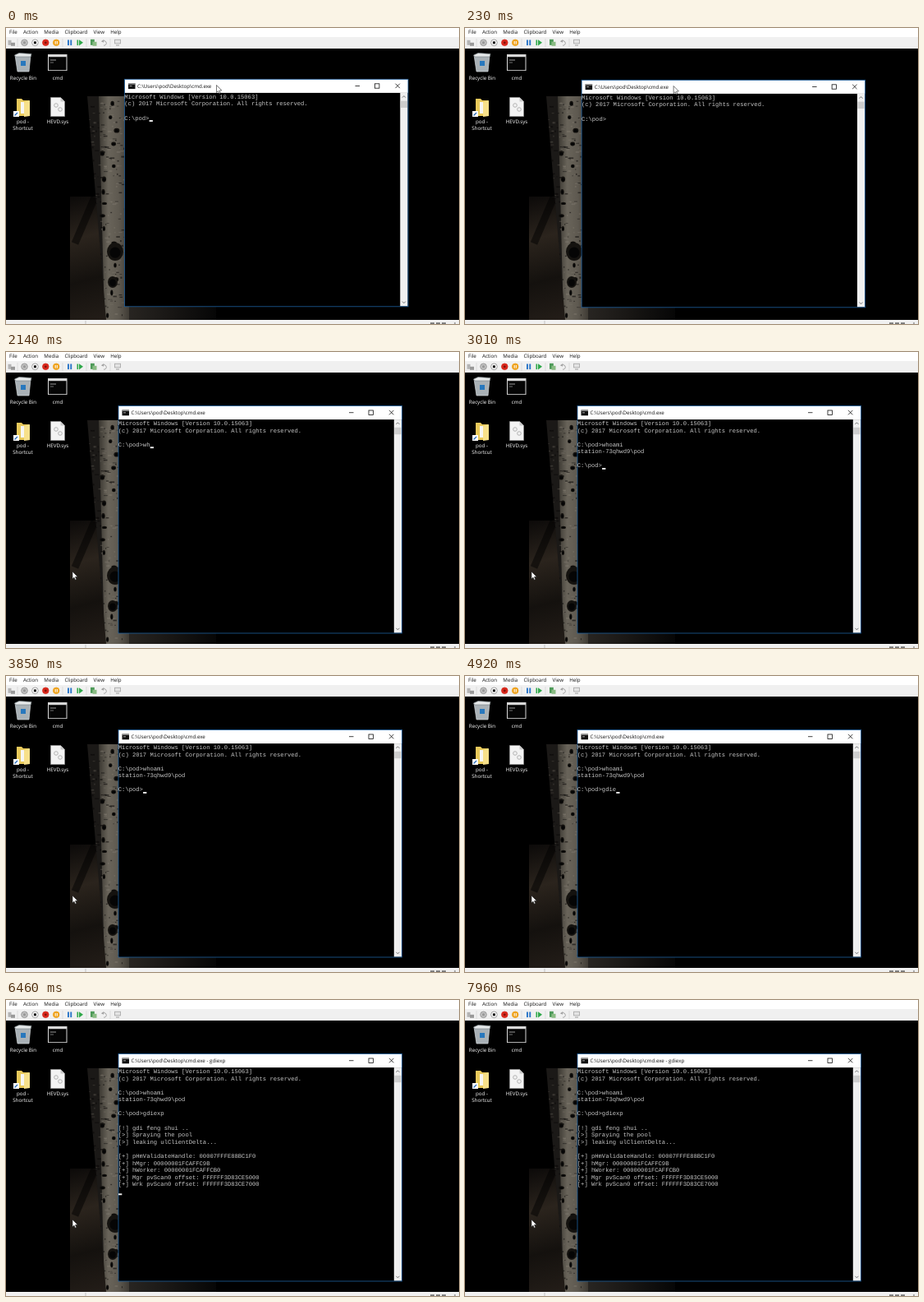
These frames come from a looping animation (552x360 px, 8000 ms). An HTML page with a canvas:

```html
<!DOCTYPE html>
<html lang="en">
<head>
<meta charset="utf-8">
<title>Console session</title>
<style>
html, body { margin: 0; width: 100%; height: 100%; overflow: hidden; background: #000; }
canvas { display: block; width: 552px; height: 360px; }
</style>
</head>
<body>
<canvas id="stage"></canvas>
<script>
const W = 552, H = 360, LOOP = 8000;
const UI = '6.2px "Open Sans", "Noto Sans", sans-serif';
const MONO = '7.16px "Liberation Mono", "DejaVu Sans Mono", monospace';
const COL = 4.295, ROW = 8.58;
const PALE = '#f0f0f0', INK = '#c8c8c8', DARK = '#111';
const user = 'pod', host = 'station-73qhwd9';
const prompt = `C:\\${user}>`;

const canvas = document.getElementById('stage');
const dpr = window.devicePixelRatio || 1;
canvas.width = W * dpr;
canvas.height = H * dpr;
let c = canvas.getContext('2d');

function rect(x, y, w, h, color) {
  c.fillStyle = color;
  c.fillRect(x, y, w, h);
}

function poly(points, fill, stroke, width = 0.7) {
  c.beginPath();
  points.forEach(([x, y]) => c.lineTo(x, y));
  c.closePath();
  c.fillStyle = fill;
  c.fill();
  if (stroke) { c.strokeStyle = stroke; c.lineWidth = width; c.stroke(); }
}

function line(x1, y1, x2, y2, color, width = 0.8) {
  c.strokeStyle = color;
  c.lineWidth = width;
  c.beginPath();
  c.moveTo(x1, y1);
  c.lineTo(x2, y2);
  c.stroke();
}

function disc(x, y, rx, ry, fill, stroke) {
  c.beginPath();
  c.ellipse(x, y, rx, ry, 0, 0, 7);
  c.fillStyle = fill;
  c.fill();
  if (stroke) { c.strokeStyle = stroke; c.lineWidth = 0.8; c.stroke(); }
}

function text(str, x, y, color, font = UI, align = 'left') {
  c.font = font;
  c.textRendering = 'geometricPrecision';
  c.fillStyle = color;
  c.textAlign = align;
  c.fillText(str, x, y);
}

const label = (str, x, y) => text(str, x, y, '#fff', UI, 'center');

function fade(x1, y1, x2, y2, ...colors) {
  const g = c.createLinearGradient(x1, y1, x2, y2);
  colors.forEach((color, i) => g.addColorStop(i / (colors.length - 1), color));
  return g;
}

function seeded(seed) {
  return () => (seed = seed * 16807 % 2147483647) / 2147483647;
}

function knot(x, y, rx, ry) {
  disc(x, y, rx, ry, '#14120f');
  disc(x, y + ry * 0.1, rx * 0.65, ry * 0.6, '#050505');
}

function wallpaper() {
  const rnd = seeded(4711);
  const top = 83, bottom = 355;
  rect(78, 205, 44, 150, fade(78, 205, 118, bottom, '#0c0a09', '#2b241d', '#14110e', '#231d18'));
  line(84, 262, 108, 206, 'rgba(0,0,0,.5)', 9);
  rect(140, 336, 116, 19, fade(140, 0, 256, 0, '#2b2824', '#191715', '#060606'));

  poly([[99, top], [150, top], [150, bottom], [122, bottom]], '#1b1917');
  c.save();
  c.clip();
  poly([[113, top], [150, top], [150, bottom], [120, bottom]],
    fade(112, 0, 150, 0, '#35322c', '#69645a', '#5e5950', '#403c35'));
  for (let i = 0; i < 260; i++) {
    const x = 100 + rnd() * 48, y = top + rnd() * (bottom - top);
    rect(x, y, 1 + rnd() * 4, 0.6 + rnd() * 1.6,
      rnd() < 0.55 ? 'rgba(8,7,6,.55)' : 'rgba(150,145,130,.25)');
  }
  for (let y = top + 8; y < bottom; y += 15) {
    knot(116 + rnd() * 20, y + rnd() * 6, 1.5 + rnd() * 2, 1.5 + rnd() * 2);
  }
  knot(133, 272, 10, 11);
  knot(130, 309, 6, 7);
  c.restore();
}

function menuBar() {
  rect(0, 0, W, 11, '#fff');
  let x = 4;
  for (const name of ['File', 'Action', 'Media', 'Clipboard', 'View', 'Help']) {
    text(name, x, 7.3, DARK);
    x += c.measureText(name).width + 7.2;
  }
}

function toolBar() {
  const y = 17.8;
  rect(0, 11, W, 14, PALE);
  rect(2.5, y - 3, 4, 6, '#b4b4b4');
  rect(6, y, 5, 4, '#999');
  for (const x of [14, 69, 98, 127]) line(x, 13, x, 23, '#d0d0d0', 0.6);

  ['#c4c4c4', '#fff', '#d8281c', '#efa21c'].forEach((fill, i) =>
    disc(22.5 + i * 12.9, y, 3.8, 3.8, fill, i < 2 ? '#8a8a8a' : fill));
  rect(21, y - 1.5, 3, 3, '#999');
  rect(33.9, y - 1.5, 3, 3, DARK);
  disc(48.3, y, 1.4, 1.4, '#7d120b');
  for (const x of [59.7, 61.8]) rect(x, y - 1.8, 1, 3.6, '#fff');

  for (const x of [75, 78.3]) rect(x, y - 3.3, 1.9, 6.6, '#2673c8');
  rect(86.5, y - 3.3, 1.6, 6.6, '#2fa84a');
  poly([[89, y - 3.6], [94, y], [89, y + 3.6]], '#2fa84a');
  rect(103, y - 4, 4.8, 7, '#4d9a58');
  rect(105.5, y - 1, 5, 5, '#8abb83');

  c.strokeStyle = '#a2a2a2';
  c.lineWidth = 1;
  c.beginPath();
  c.arc(119.5, y + 0.6, 2.8, -2.3, 1.7);
  c.stroke();
  poly([[115.8, y - 1.6], [119.3, y - 3.8], [119.1, y]], '#a2a2a2');
  rect(132, y - 4, 8, 5.5, '#b0b0b0');
  rect(133, y - 3, 6, 3.5, '#e4e4e4');
  rect(134, y + 2.7, 4, 1, '#a0a0a0');
}

function statusBar() {
  rect(0, 355, W, 5, PALE);
  line(97, 356, 97, 360, '#b0b0b0', 0.7);
  for (let i = 0; i < 3; i++) rect(517 + i * 7, 358.2, 5, 1.8, '#777');
  rect(546, 358, 2, 2, '#aaa');
}

function icons() {
  // bin
  poly([[11, 33], [30, 33], [28, 53], [14, 53]], '#a9b1b6', '#d4d8da');
  poly([[10.5, 33], [16, 30.5], [31, 31.5], [30, 35], [12, 35]], '#e6e9ea', '#7f878a');
  rect(18, 40, 6, 6, '#2878bd');
  label('Recycle Bin', 21, 63);

  // console
  rect(51, 32, 23.5, 20, '#d8d8d8');
  rect(52, 35.2, 21.5, 16, '#050505');
  line(54, 39, 61, 39, '#bbb');
  line(54, 42, 58, 42, '#888');
  label('cmd', 63, 63);

  // folder link
  poly([[13, 86], [19, 86], [21, 88], [28, 88], [28, 107], [13, 107]], '#e8c95a');
  rect(18, 90, 7, 14, '#f6f6f2');
  poly([[22, 90], [29, 88], [29, 107], [22, 108]], '#f7e08a');
  rect(9, 101, 7, 7, '#fff');
  line(10.5, 106.5, 14, 103, '#2468b4', 1.2);
  label(user + ' -', 20.5, 116);
  label('Shortcut', 20.5, 123.9);

  // system file
  poly([[54.5, 84.5], [66.5, 84.5], [71.5, 89.5], [71.5, 107.5], [54.5, 107.5]], '#f3f3f3', '#999');
  poly([[66.5, 84.5], [71.5, 89.5], [66.5, 89.5]], '#c9c9c9');
  disc(61, 94, 2.3, 2.3, '#f3f3f3', '#a4a4a4');
  disc(66, 99, 2.3, 2.3, '#f3f3f3', '#a4a4a4');
  label('HEVD.sys', 63, 116);
}

function desktop() {
  rect(0, 0, W, H, '#000');
  wallpaper();
  menuBar();
  toolBar();
  statusBar();
  icons();
}

// what appears in the console and when, in ms
const KEY = 142, WHOAMI = 1900, ENTER_1 = 2900, GDIEXP = 4420, ENTER_2 = 5540, LEAK = 5900;

const banner = ['Microsoft Windows [Version 10.0.15063]',
  '(c) 2017 Microsoft Corporation. All rights reserved.', ''];
const spray = ['', '[!] gdi feng shui ..', '[>] Spraying the pool', '[>] leaking ulClientDelta...'];
const leak = ['', '[+] pHmValidateHandle: 00007FFFE88BC1F0', '[+] hMgr: 00000001FCAFFC9B',
  '[+] hWorker: 00000001FCAFFCB0', '[+] Mgr pvScan0 offset: FFFFFF3D83CE5000',
  '[+] Wrk pvScan0 offset: FFFFFF3D83CE7000'];

const typed = (word, from, t) => word.slice(0, Math.max(0, Math.ceil((t - from) / KEY)));

function screen(t) {
  const rows = [...banner, prompt + typed('whoami', WHOAMI, t)];
  if (t >= ENTER_1) rows.push(`${host}\\${user}`, '', prompt + typed('gdiexp', GDIEXP, t));
  if (t >= ENTER_2) rows.push(...spray);
  if (t >= LEAK) rows.push(...leak);
  if (t >= ENTER_2) rows.push('');
  return rows;
}

function chevron(x, y, dy) {
  line(x - 2, y, x, y + dy, '#555');
  line(x, y + dy, x + 2, y, '#555');
}

function titleBar(w, title) {
  rect(0, 0, w, 16.6, '#fff');
  rect(4.5, 5, 8.5, 6.8, DARK);
  rect(4.5, 5, 8.5, 1.3, '#aaa');
  line(6, 8.3, 9, 8.3, '#ddd', 0.7);
  text(title, 15.5, 10.3, DARK);
  line(281, 8.2, 286.5, 8.2, DARK);
  c.strokeStyle = DARK;
  c.lineWidth = 0.8;
  c.strokeRect(305, 5.5, 5.4, 5.4);
  line(330, 5.4, 335.4, 10.8, DARK);
  line(335.4, 5.4, 330, 10.8, DARK);
}

function consoleWindow(t, x, y) {
  const w = 345.5, h = 276.5;
  c.save();
  c.translate(x, y);
  rect(0, 0, w, h, '#000');
  const title = `C:\\Users\\${user}\\Desktop\\cmd.exe`;
  titleBar(w, t >= ENTER_2 ? title + ' - gdiexp' : title);

  rect(335.8, 16.6, 9.2, h - 17, PALE);
  rect(336.3, 26.3, 8.2, 8.4, '#cdcdcd');
  chevron(340.4, 22.3, -2);
  chevron(340.4, 270.3, 2);
  c.strokeStyle = '#1d5f9f';
  c.lineWidth = 0.8;
  c.strokeRect(0, 0, w, h);

  const rows = screen(t), last = rows.length - 1;
  rows.forEach((row, i) => text(row, -0.2, 23.5 + i * ROW, INK, MONO));
  if ((t + 410) % 1060 < 530) {
    rect(rows[last].length * COL, 24 + last * ROW, COL, 1.9, '#f0f0f0');
  }
  c.restore();
}

function pointer(x, y) {
  c.save();
  c.translate(x, y);
  poly([[0, 0], [0, 9], [2, 7.2], [3.4, 10.2], [4.8, 9.6], [3.5, 6.6], [6.3, 6.4]], '#fff', '#222', 0.6);
  c.restore();
}

function glide(t, from, length) {
  const p = Math.min(1, Math.max(0, (t - from) / length));
  return p * p * (3 - 2 * p);
}

function draw(t) {
  const drag = glide(t, 100, 350), sweep = glide(t, 560, 400), settle = glide(t, 1060, 390);
  c.drawImage(backdrop, 0, 0, W, H);
  consoleWindow(t, 144.5 - 7.5 * drag, 62.3 + 3.2 * drag);
  pointer(256.5 - 7.5 * drag - 142.5 * sweep - 25.5 * settle,
    69.5 + 3.2 * drag + 156.8 * sweep + 37.5 * settle);
}

// the desktop never changes, so it is painted once
const backdrop = document.createElement('canvas');
backdrop.width = canvas.width;
backdrop.height = canvas.height;
const view = c;
c = backdrop.getContext('2d');
c.scale(dpr, dpr);
desktop();
c = view;
c.scale(dpr, dpr);

const start = performance.now();
function frame() {
  draw((performance.now() - start) % LOOP);
  requestAnimationFrame(frame);
}
frame();
</script>
</body>
</html>
```
